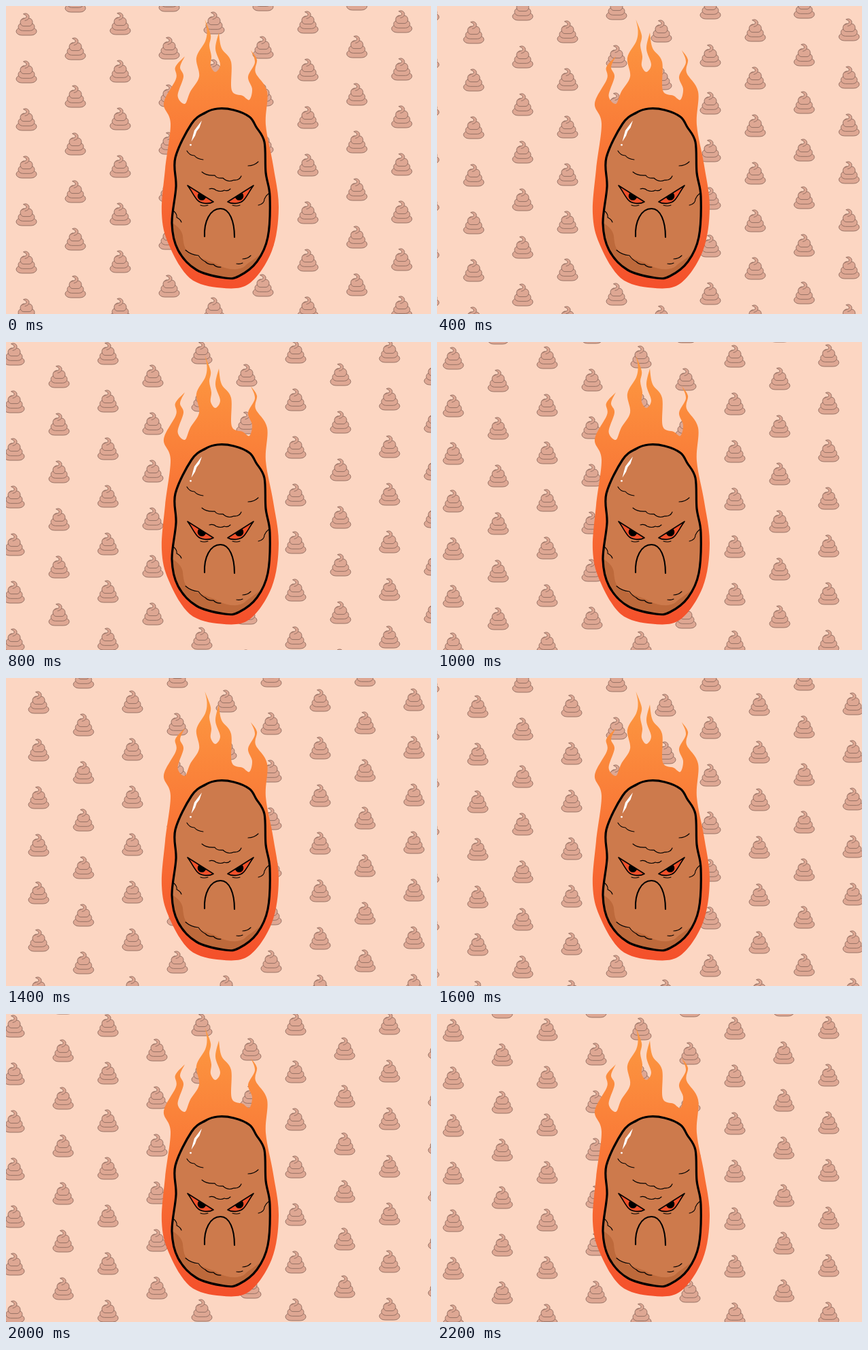
Animation, 625 px wide and 453 px high, one loop 2300 ms. Source, as an HTML page:

```html
<!DOCTYPE html>
<html lang="en">
<head>
<meta charset="utf-8">
<title>Angry potato on fire</title>
<style>
  html, body { margin: 0; width: 100%; height: 100%; overflow: hidden; background: #fcd6c2; }
  svg { display: block; width: 625px; height: 453px; }
</style>
</head>
<body>
<svg viewBox="0 0 625 453" xmlns="http://www.w3.org/2000/svg">
  <defs>
    <linearGradient id="fire" gradientUnits="userSpaceOnUse" x1="0" y1="20" x2="0" y2="414">
      <stop offset="0" stop-color="#fd9a41"/>
      <stop offset="1" stop-color="#f4502b"/>
    </linearGradient>
    <path id="potato"/>
    <clipPath id="inside"><use href="#potato"/></clipPath>
    <path id="eyeShape" d="M267 264 L305 288 C298 292 286 291 281 285 C276 279 273 272 267 264Z"/>
    <clipPath id="eyeClip"><use href="#eyeShape"/></clipPath>
    <g id="swirl" fill="#dea793" stroke="#977265" stroke-linecap="round" stroke-linejoin="round"></g>
    <g id="eye">
      <use href="#eyeShape" fill="#f0512b"/>
      <circle cx="288" cy="279.5" r="6.3" clip-path="url(#eyeClip)"/>
      <use href="#eyeShape" fill="none" stroke="#000" stroke-width="1.6" stroke-linejoin="round"/>
    </g>
  </defs>

  <rect width="625" height="453" fill="#fcd6c2"/>
  <g id="wallpaper"></g>
  <path id="flame" fill="url(#fire)"/>
  <use href="#potato" fill="#cd7a4c"/>
  <path clip-path="url(#inside)" fill="#bd693b" d="M240 316 C250 322 258 328 260 338 C261 352 263 360 273 365
    C290 373 302 375 314 382 C326 388 343 390 352 382 C358 375 373 371 386 350 V410 H240Z"/>
  <use href="#potato" fill="none" stroke="#000" stroke-width="3.2" stroke-linejoin="round"/>
  <path fill="#fff" d="M288 168.5 L284.5 179 L280.5 184 L278 191 L272.5 199.5 L275 190 L277 183 L281.5 177Z"/>
  <circle cx="271.5" cy="204.3" r="1.4" fill="#fff"/>
  <g fill="none" stroke="#000" stroke-width="1.1" stroke-linecap="round" stroke-linejoin="round">
    <path d="M266 213 Q270 220 277 220 Q281 225 290 226 M356 235 Q365 235 371 229"/>
    <path d="M288 244 Q295 250 307 249 Q310 254 319 253 Q326 260 335 256 Q343 257 346 250"/>
    <path d="M299 269 Q305 267 309 271 Q316 274 321 271 Q326 273 330 269"/>
    <path d="M371 293 Q380 291 380 284 Q382 279 386 276 M246 301 Q252 306 251 311 Q256 313 258 318"/>
    <path d="M286 293 Q291 295 297 293 M333 293 Q339 295 344 293"/>
    <path d="M264 359 Q272 366 283 367 Q288 374 293 376 Q298 381 305 380 Q310 385 316 384"/>
    <path d="M348 372 Q355 372 360 367 M339 379 Q344 380 348 378"/>
    <path d="M292 339 C291 317 300 298 315.5 298 C329 298 336 317 336 340" stroke-width="2.1"/>
  </g>
  <use href="#eye"/>
  <use href="#eye" transform="translate(631) scale(-1 1)"/>
</svg>
<script>
  const byId = id => document.getElementById(id);

  // Smooth curve through key points "x,y x,y ..." (Catmull-Rom as cubics)
  function through(text, closed) {
    const pts = text.trim().split(/\s+/).map(p => p.split(',').map(Number));
    const n = pts.length;
    const at = i => closed ? pts[(i + n) % n] : pts[Math.max(0, Math.min(n - 1, i))];
    let d = closed ? 'M' + pts[0] : 'L' + pts[0];
    for (let i = 0; i < (closed ? n : n - 1); i++) {
      const [a, b, c, e] = [at(i - 1), at(i), at(i + 1), at(i + 2)];
      const c1 = b.map((v, k) => v + (c[k] - a[k]) / 6);
      const c2 = c.map((v, k) => v - (e[k] - b[k]) / 6);
      d += `C${c1} ${c2} ${c}`;
    }
    return d;
  }

  byId('potato').setAttribute('d', through(`311,151 335,153 358,163 368,178 380,200 382,245 388,280 385,340
    369,376 343,397 322,400 280,388 253,359 244,320 250,266 249,223 273,173 293,157`, true));

  // Each stretch runs from one flame tip to the next
  const notches = {
    centre: '292.5,20 301,43 299,58 302,74 301,88 308,97 315,86 308,63 313,39',
    right: '313,39 317,62 331,82 332,124 348,132 358,138 362,122 356,104 366,83 360,65',
    around: `360,65 369,79 367,98 384,126 382,175 393,235 401,297 391,360 358,408 316,414.5
      270,400 239,350 229,305 234,240 242,173 232,143 250,107 249,90 263,74`,
    left: '263,74 256,90 261,104 252.5,132 263,144 271,126 284,104 280,76 293,52 295.5,36 292.5,20'
  };
  byId('flame').setAttribute('d',
    'M292.5 20' + Object.values(notches).map(s => through(s)).join('') + 'Z');

  // Three stacked rolls, each narrower than the one below, under a curled tip
  let swirl = '';
  for (let roll = 0; roll < 3; roll++) {
    const half = 15 - 3 * roll, top = 4.5 - 6.7 * roll;
    swirl += `<rect x="${-half}" y="${top}" width="${2 * half}" height="11.5" rx="${half * 0.55}" ry="5.75"/>`;
  }
  byId('swirl').innerHTML = swirl +
    '<path d="M-7.5 -6.5 C-5 -9 1 -8.5 0 -12 C-0.5 -14 -3 -14 -4.5 -15.3 C0 -17.5 4.5 -14.5 4 -10.5 Q3.5 -6.5 -2 -5.5"/>';

  const place = (x, y) => `<use href="#swirl" x="${x}" y="${y}"/>`;
  let tiles = '';
  for (let col = -2; col < 5; col++)
    for (let row = -2; row < 7; row++) {
      const x = 138 * col, y = 70 * row - col;
      tiles += place(30 + x, 27 + y) + place(102 + x, 63 + y);
    }
  const wallpaper = byId('wallpaper');
  wallpaper.innerHTML = tiles;

  const LOOP = 2300, STEP = 100;
  const start = performance.now();

  function draw(now) {
    const step = Math.floor((Math.max(0, now - start) % LOOP) / STEP);
    wallpaper.setAttribute('transform', `translate(${6 * step} ${3 * step})`);
    requestAnimationFrame(draw);
  }
  draw(start);
</script>
</body>
</html>
```
